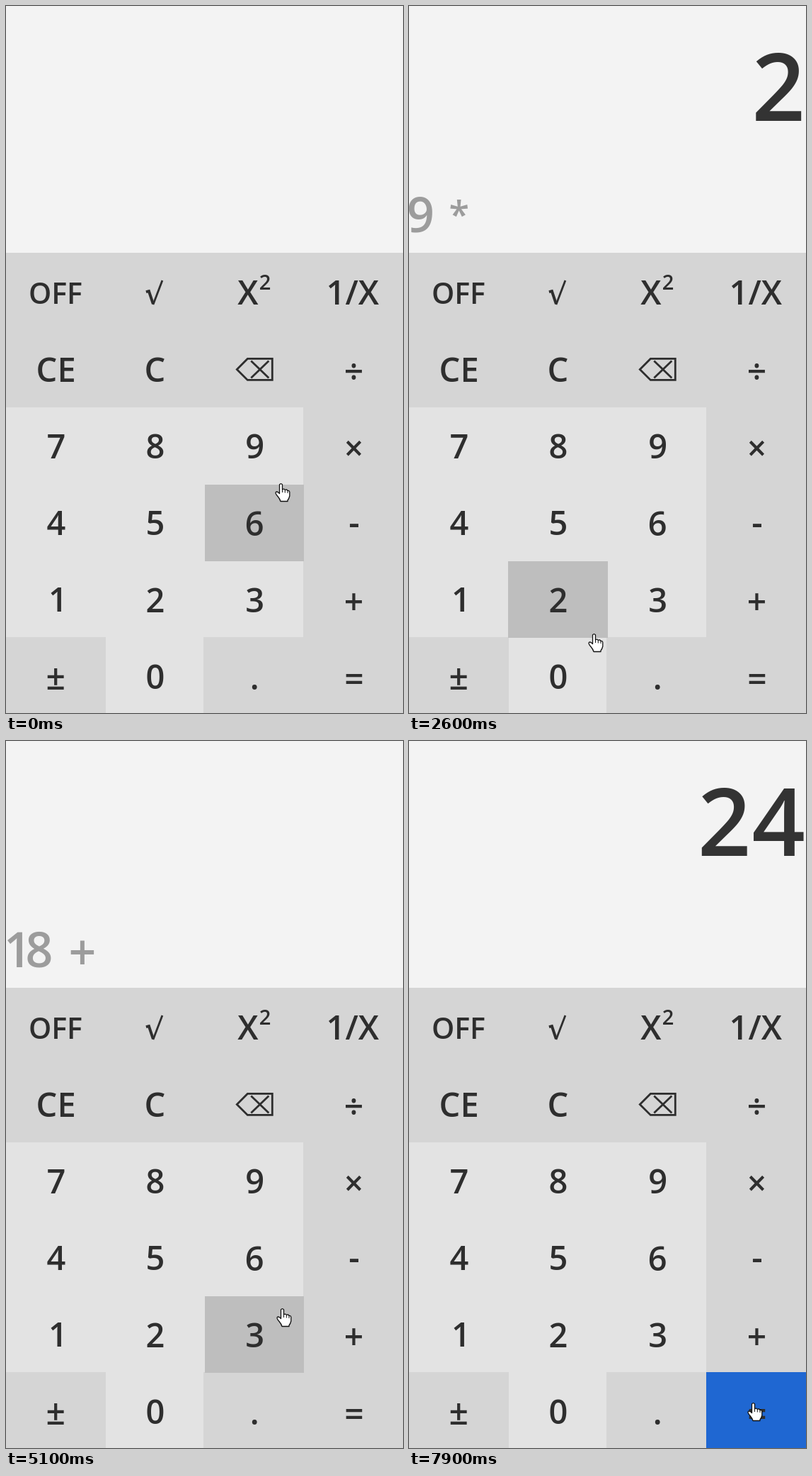
An HTML page with a canvas that plays this animation: 561x997 px, repeating every 8 s.

```html
<!DOCTYPE html>
<html lang="en">
<head>
<meta charset="utf-8">
<title>Calculator</title>
<style>
html, body { margin: 0; width: 100%; height: 100%; overflow: hidden; background: #f3f3f3; }
canvas { display: block; width: 561px; height: 997px; }
</style>
</head>
<body>
<canvas id="stage" width="561" height="997"></canvas>
<script>
const ctx = document.getElementById('stage').getContext('2d');
const W = 561, H = 997, TOP = 348, LOOP = 8000, STEP = 100;
const CELL_W = 140.4, CELL_H = 108.3;
const INK = '#2e2e2e';

const GRID = ['OFF √ X² 1/X', 'CE C ⌫ ÷', '7 8 9 ×', '4 5 6 -', '1 2 3 +', '± 0 . =']
  .map(row => row.split(' '));
const CLICKS = [
  [1000, '9'], [1500, '×'], [2300, '2'], [3100, '='], [4700, '+'], [5600, '6'], [7200, '=']
];
// Key points of the pointer tip: time, x, y
const PATH = [
  [0, 388, 673], [300, 430, 640], [700, 372, 627], [1000, 372, 627], [1600, 492, 630],
  [1800, 494, 690], [2200, 235, 835], [2600, 261, 885], [2700, 450, 926], [3100, 490, 943],
  [3600, 490, 943], [4400, 488, 826], [4700, 488, 826], [5100, 390, 800], [5500, 369, 718],
  [5900, 369, 718], [6500, 506, 929], [7800, 506, 929], [7900, 486, 933], [LOOP, 486, 933]
];
// How a pending operator is shown after its number
const OPERATORS = {
  '×': { glyph: '*', gap: 34, y: 285, size: 52, apply: (a, b) => a * b },
  '+': { glyph: '+', gap: 41, y: 298, size: 68, apply: (a, b) => a + b }
};

function setFont(size, color) {
  ctx.font = `600 ${size}px "Open Sans", "Noto Sans", sans-serif`;
  ctx.fillStyle = color;
}

// Centres the inked box of the text on x, y
function label(text, x, y, size = 47, color = INK) {
  setFont(size, color);
  const m = ctx.measureText(text);
  ctx.fillText(text,
    x + (m.actualBoundingBoxLeft - m.actualBoundingBoxRight) / 2,
    y + (m.actualBoundingBoxAscent - m.actualBoundingBoxDescent) / 2);
}

const advance = (digit, size) => size * (digit === '1' ? 0.45 : 0.58);
const numberWidth = (text, size) => [...text].reduce((sum, d) => sum + advance(d, size), 0);

function drawNumber(text, x, baseline, size, color) {
  setFont(size, color);
  for (const d of text) {
    ctx.fillText(d, x, baseline);
    x += advance(d, size);
  }
  return x;
}

function line(width, ...pts) {
  ctx.beginPath();
  for (let i = 0; i < pts.length; i += 2) ctx.lineTo(pts[i], pts[i + 1]);
  ctx.lineWidth = width;
  ctx.strokeStyle = INK;
  ctx.stroke();
}

// Keys that are not plain centred text
const SPECIAL = {
  '√'(x, y) {
    line(4, x - 13, y - 1, x - 9, y - 2, x - 3, y + 16);
    line(2.8, x - 3, y + 17, x + 10, y - 17);
  },
  'X²'(x, y) {
    label('X', x - 9, y);
    label('2', x + 15, y - 14.5, 29);
  },
  '⌫'(x, y) {
    line(2.8, x - 10, y - 15, x + 25, y - 15, x + 25, y + 15, x - 10, y + 15,
      x - 25, y, x - 10, y - 15, x - 6, y - 15);
    line(2.8, x - 5, y - 12, x + 20, y + 12);
    line(2.8, x - 5, y + 12, x + 20, y - 12);
  },
  'OFF': (x, y) => label('OFF', x, y + 0.5, 41),
  '.': (x, y) => label('.', x, y + 14)
};

function drawKey(key, col, row) {
  const x = (col + 0.5) * CELL_W + 0.3, y = 404.1 + CELL_H * row;
  if (SPECIAL[key]) SPECIAL[key](x, y);
  else if ('÷×-+=±'.includes(key)) label(key, x, y + 3, 48);
  else label(key, x, y);
}

function drawDisplay(t) {
  let shown = '', left = '', op = null;
  for (const [time, key] of CLICKS) {
    if (time > t) break;
    if (key === '=') {
      shown = String(op.apply(+left, +shown));
      left = '';
    } else if (OPERATORS[key]) {
      [left, shown, op] = [shown, '', OPERATORS[key]];
    } else shown += key;
  }
  drawNumber(shown, W - numberWidth(shown, 132), 162, 132, '#333');
  if (left) {
    const end = drawNumber(left, -3, 318.5, 68, '#9c9c9c');
    label(op.glyph, end + op.gap, op.y, op.size, '#9c9c9c');
  }
}

function pointerAt(t) {
  const i = PATH.findIndex(p => p[0] > t);
  const [t0, x0, y0] = PATH[i - 1], [t1, x1, y1] = PATH[i];
  const k = (t - t0) / (t1 - t0), ease = k * k * (3 - 2 * k);
  return [x0 + (x1 - x0) * ease, y0 + (y1 - y0) * ease];
}

function rect(color, x0, y0, x1, y1) {
  ctx.fillStyle = color;
  ctx.fillRect(x0, y0, x1 - x0, y1 - y0);
}

function drawHover(px, py) {
  const col = Math.floor(px / CELL_W), row = Math.floor((py + 2 - TOP) / CELL_H);
  const isSide = col === 3;
  const x = Math.round(col * CELL_W), right = Math.round((col + 1) * CELL_W);
  const y = Math.round(TOP + row * CELL_H + (isSide ? 0.5 : 2)), bottom = y + 108;
  rect(isSide ? '#1f67d2' : '#bebebe', isSide ? x - 1 : x, y, right, bottom);
}

function drawHand(x, y) {
  ctx.save();
  ctx.translate(Math.round(x), Math.round(y));
  const body = new Path2D(
    'M-1.5 2Q0.5-0.8 2.5 2V9Q5 7 6.3 9.5Q8.8 8 10 10.5Q12.5 10 12.8 12.5V18' +
    'Q12 21.5 10 24V25.5H0Q-1 22-4 18.5Q-8 14-6.6 12.4Q-4.5 11-1.5 14.5Z');
  ctx.lineJoin = 'round';
  ctx.lineWidth = 1.3;
  ctx.fillStyle = '#fff';
  ctx.strokeStyle = '#111';
  ctx.fill(body);
  ctx.stroke(body);
  ctx.lineWidth = 1;
  ctx.stroke(new Path2D('M2.5 9V13M6.3 9.5V13.5M10 10.5V14'));
  ctx.restore();
}

function draw(t) {
  rect('#f3f3f3', 0, 0, W, TOP);
  rect('#d5d5d5', 0, TOP, W, H);
  rect('#e3e3e3', 0, 566, 420, 890);
  rect('#e3e3e3', 141, 890, 279, H);
  drawDisplay(t);

  const [x, y] = pointerAt(t);
  drawHover(x, y);
  GRID.forEach((keys, row) => keys.forEach((key, col) => drawKey(key, col, row)));
  drawHand(x, y);
}

let start;
function tick(now) {
  start ??= now;
  draw(Math.floor(((now - start) % LOOP) / STEP) * STEP);
  requestAnimationFrame(tick);
}
draw(0);
requestAnimationFrame(tick);
</script>
</body>
</html>
```
